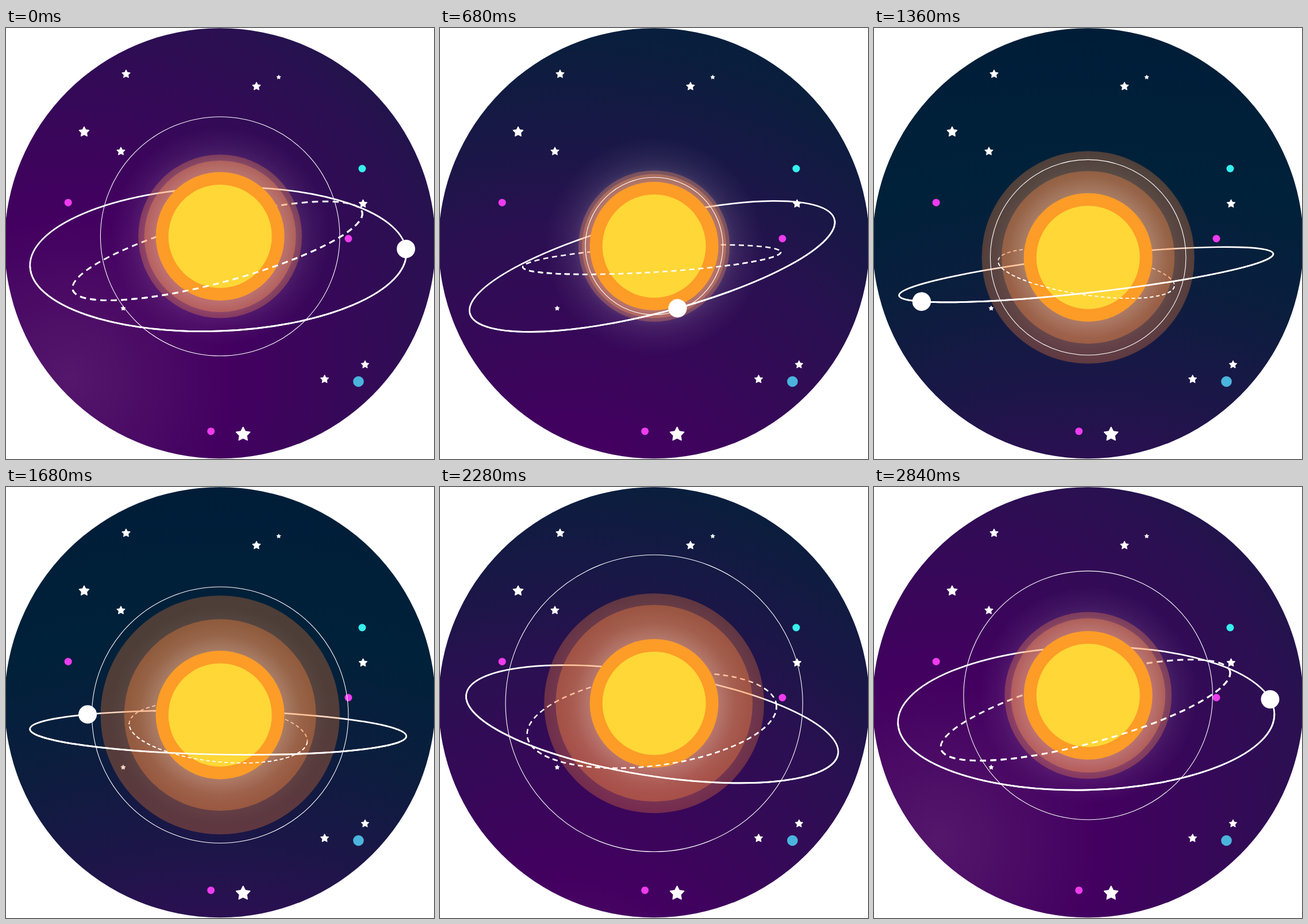
Write an HTML page without scripts that moves like this. It is 745 by 751 pixels and loops after 2.88 s.

```html
<!DOCTYPE html>
<html lang="en">
<head>
<meta charset="utf-8">
<title>Sun and orbits</title>
<style>
html, body { margin: 0; width: 100%; height: 100%; overflow: hidden; background: #fff; }
svg { display: block; width: 100vw; height: 100vh; }

.sky, .sun, .halo, .ring, .orbit, .path, .planet, .belt, .band {
  --soft: cubic-bezier(.333, 0, .667, 1);
  animation: 2880ms linear infinite;
}

/* sky */
.sky { animation-name: drift; }
@keyframes drift {
  0%, 100% { translate: 110px 610px }
  12.5% { translate: 110px 700px }
  36.1% { translate: 340px 1340px }
  50% { translate: 370px 1420px }
  58.3% { translate: 370px 1400px }
  69.4% { translate: 350px 1290px }
  87.5% { translate: 110px 690px }
}

/* sun, halos and pulse ring */
.sun { animation-name: bob; animation-timing-function: var(--soft); }
@keyframes bob {
  0%, 100% { translate: 372.7px 363px }
  50% { translate: 372.7px 400px }
}
.halo { fill: #ff8232; }
.outer { animation-name: outer; fill-opacity: .3; }
.inner { animation-name: inner; fill-opacity: .35; }
.ring { animation-name: pulse; fill: none; stroke: #fff; stroke-width: 1.1; }
@keyframes outer {
  0%, 100% { r: 142.5px }
  6.25% { r: 134.5px }
  12.5% { r: 130px }
  18.1% { r: 129px }
  24.3% { r: 132px }
  29.9% { r: 140px }
  36.1% { r: 154.5px }
  47.2% { r: 185px }
  52.8% { r: 199px }
  58.3% { r: 208px }
  63.9% { r: 211px }
  69.4% { r: 208px }
  78.5% { r: 193px }
  87.5% { r: 172px }
  98.6% { r: 145.5px }
}
@keyframes inner {
  0%, 100% { r: 132px }
  6.25% { r: 128px }
  12.5% { r: 126px }
  20% { r: 124.5px }
  29.9% { r: 127px }
  36.1% { r: 132px }
  41.7% { r: 141px }
  52.8% { r: 160px }
  58.3% { r: 167px }
  69.4% { r: 171px }
  80.6% { r: 171.5px }
  87.5% { r: 167px }
  90.3% { r: 161px }
  95.8% { r: 143px }
  98.6% { r: 134.5px }
}
@keyframes pulse {
  0%, 100% { r: 208.5px }
  4.2% { r: 183px }
  8.3% { r: 161px }
  12.5% { r: 143px }
  18.1% { r: 126px }
  24.3% { r: 119px }
  29.9% { r: 120px }
  36.1% { r: 132.5px }
  41.7% { r: 148px }
  47.2% { r: 170px }
  58.3% { r: 223px }
  63.9% { r: 239px }
  69.4% { r: 250px }
  75% { r: 257px }
  78.5% { r: 259px }
  82.6% { r: 257px }
  87.5% { r: 249px }
  95.1% { r: 229px }
  98.6% { r: 217px }
}

/* solid orbit */
.orbit { animation-name: sink, swing; animation-timing-function: var(--soft), linear; }
.path { animation-name: flatten; animation-timing-function: var(--soft); }
.path, .band { fill: none; stroke: #fff; stroke-width: 2.7; }
@keyframes sink {
  0%, 100% { translate: 369.3px 403px }
  50% { translate: 369.3px 430px }
}
@keyframes flatten {
  0%, 100% { ry: 125px }
  50% { ry: 31px }
}
@keyframes swing {
  0%, 100% { rotate: -2.15deg }
  6.25% { rotate: -7deg }
  12.5% { rotate: -11.1deg }
  18.1% { rotate: -13.6deg }
  24.3% { rotate: -14.6deg }
  29.9% { rotate: -14.2deg }
  36.1% { rotate: -12.3deg }
  41.7% { rotate: -9.6deg }
  47.2% { rotate: -6.4deg }
  58.3% { rotate: 1.06deg }
  69.4% { rotate: 8deg }
  74.3% { rotate: 9.3deg }
  78.5% { rotate: 9.3deg }
  82.6% { rotate: 8.4deg }
  87.5% { rotate: 6.05deg }
  98.6% { rotate: -1.4deg }
}

/* planet: even speed along the changing ellipse */
.planet {
  fill: #fff;
  offset-rotate: 0deg;
  animation-name: track, travel;
  animation-timing-function: var(--soft), linear;
  animation-delay: 0s, -2868ms;
}
.planet.near {
  animation-name: track, travel, front;
  animation-timing-function: var(--soft), linear, linear;
  animation-delay: 0s, -2868ms, -2868ms;
}
@keyframes track {
  0%, 100% { offset-path: path("M327.7 0A327.7 125 0 0 1 -327.7 0A327.7 125 0 0 1 327.7 0Z") }
  50% { offset-path: path("M327.7 0A327.7 31 0 0 1 -327.7 0A327.7 31 0 0 1 327.7 0Z") }
}
@keyframes travel {
  from { offset-distance: 0% }
  to { offset-distance: 100% }
}
@keyframes front {
  0%, 49.99% { opacity: 1 }
  50%, 100% { opacity: 0 }
}

/* dashed orbit */
.belt {
  animation-name: dip, tilt, shrink;
  animation-timing-function: var(--soft), var(--soft), cubic-bezier(.6, 0, .4, 1);
  animation-delay: -2800ms, -40ms, -2820ms;
}
.band {
  stroke-width: 3;
  stroke-dasharray: 10.5 7.5;
  animation-name: open;
  animation-timing-function: var(--soft);
  animation-delay: -2250ms;
}
@keyframes dip {
  0%, 100% { translate: 368px 388px }
  50% { translate: 369.5px 429px }
}
@keyframes tilt {
  0%, 100% { rotate: -15.1deg }
  50% { rotate: 8.4deg }
}
@keyframes shrink {
  0%, 100% { scale: 1 }
  50% { scale: .59 }
}
@keyframes open {
  0%, 100% { ry: 25.5px }
  50% { ry: 98.7px }
}
</style>
</head>
<body>
<svg viewBox="0 0 745 751" preserveAspectRatio="none">
  <defs>
    <radialGradient id="night">
      <stop offset="0" stop-color="#54176b"/>
      <stop offset=".187" stop-color="#430060"/>
      <stop offset=".44" stop-color="#2a1051"/>
      <stop offset=".52" stop-color="#1c1648"/>
      <stop offset=".653" stop-color="#0a1e3d"/>
      <stop offset=".767" stop-color="#00213a"/>
      <stop offset=".933" stop-color="#001d38"/>
    </radialGradient>
    <radialGradient id="glow">
      <stop offset=".59" stop-color="#fff" stop-opacity=".23"/>
      <stop offset=".74" stop-color="#fff" stop-opacity=".09"/>
      <stop offset=".84" stop-color="#fff" stop-opacity=".045"/>
      <stop offset="1" stop-color="#fff" stop-opacity="0"/>
    </radialGradient>
    <clipPath id="disc"><circle cx="372.5" cy="375.2" r="375"/></clipPath>
    <clipPath id="lower"><rect x="-400" y="0" width="800" height="300"/></clipPath>
    <path id="star" d="M0-9.4 2.8-3.9 9-2.9 4.6 1.5 5.5 7.6 0 4.8-5.5 7.6-4.6 1.5-9-2.9-2.8-3.9Z"
      fill="#fff" stroke="#fff" stroke-width="1.4" stroke-linejoin="round"/>
  </defs>

  <g clip-path="url(#disc)">
    <circle class="sky" r="1500" fill="url(#night)"/>
  </g>

  <use href="#star" transform="translate(209 80.4) scale(.78)"/>
  <use href="#star" transform="translate(436 101.8) scale(.78)"/>
  <use href="#star" transform="translate(474.7 85.8) scale(.42)"/>
  <use href="#star" transform="translate(136 181) scale(.96)"/>
  <use href="#star" transform="translate(200 215) scale(.78)"/>
  <use href="#star" transform="translate(621.5 306.3) scale(.78)"/>
  <use href="#star" transform="translate(204 488.5) scale(.46)"/>
  <use href="#star" transform="translate(554.6 612) scale(.78)"/>
  <use href="#star" transform="translate(625 586.6) scale(.74)"/>
  <use href="#star" transform="translate(412.7 708) scale(1.32)"/>

  <g fill="#ee3bee">
    <circle cx="108.2" cy="304.2" r="6.5"/>
    <circle cx="596" cy="367" r="6.5"/>
    <circle cx="356.7" cy="702.7" r="6.5"/>
  </g>
  <circle cx="620" cy="245" r="6.5" fill="#36f1ee"/>
  <circle cx="613.5" cy="616" r="9.3" fill="#4bb4dd"/>

  <!-- far side -->
  <g class="belt"><ellipse class="band" rx="261"/></g>
  <g class="orbit">
    <ellipse class="path" rx="327.7"/>
    <circle class="planet" r="16"/>
  </g>

  <g class="sun">
    <circle class="halo outer"/>
    <circle class="halo inner"/>
    <circle r="190" fill="url(#glow)"/>
    <circle class="ring"/>
    <circle r="112" fill="#fd9c27"/>
    <circle r="90" fill="#ffd737"/>
  </g>

  <!-- near side -->
  <g class="belt"><ellipse class="band" rx="261" clip-path="url(#lower)"/></g>
  <g class="orbit">
    <ellipse class="path" rx="327.7" clip-path="url(#lower)"/>
    <circle class="planet near" r="16"/>
  </g>
</svg>
</body>
</html>
```
